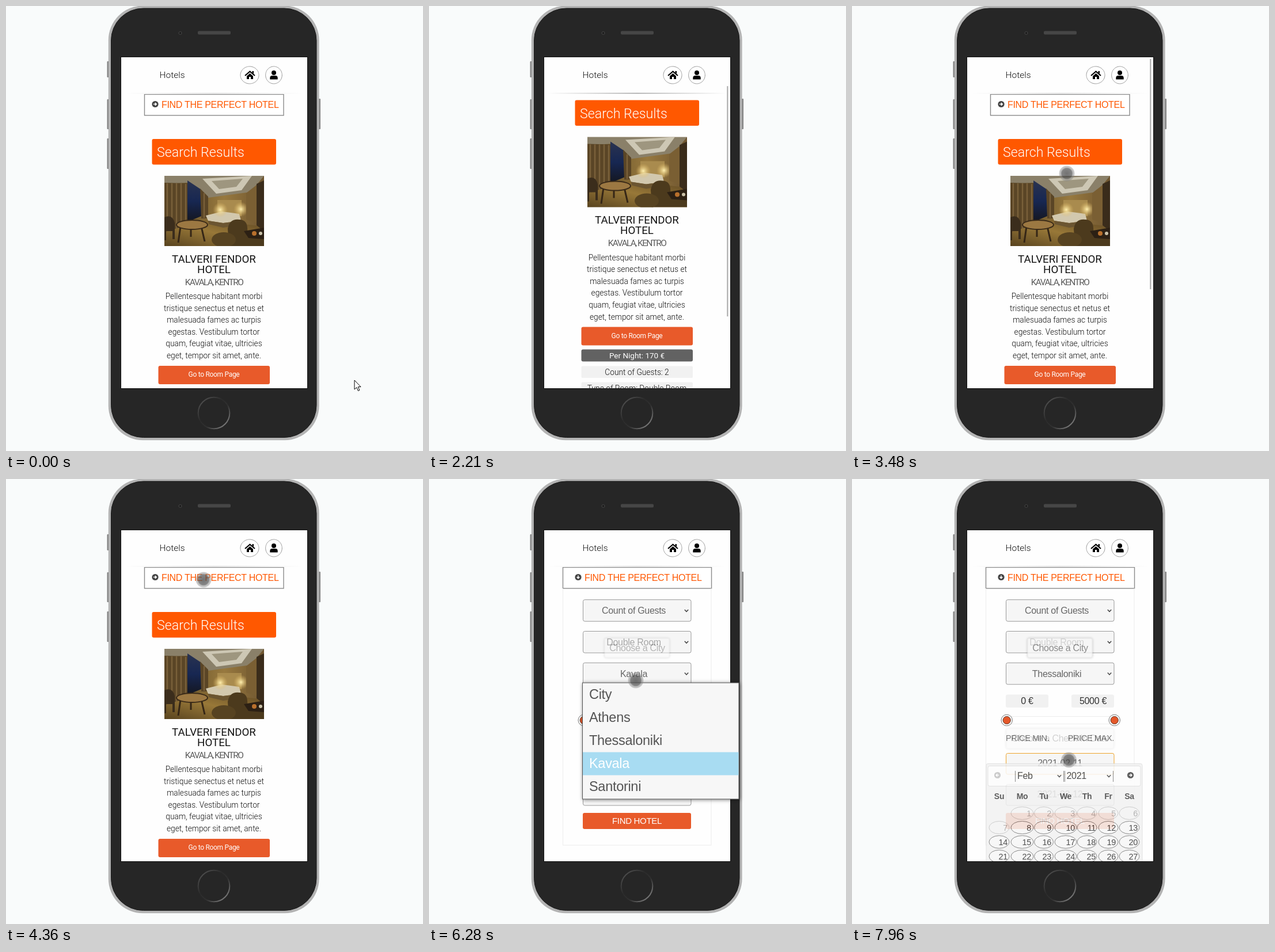
Recreate the animation shown at these times as an HTML page. Size 724 by 773 pixels, loop 8000 ms.

```html
<!DOCTYPE html>
<html lang="en">
<head>
<meta charset="utf-8">
<title>Hotel search on a phone</title>
<style>
html, body { margin: 0; width: 100%; height: 100%; overflow: hidden; background: #f9fbfb; }
svg { display: block; }
text { white-space: pre; }
.r { font-family: Roboto, sans-serif; font-weight: 300; fill: #111; }
.a { font: 16px "Liberation Sans", Arial, sans-serif; letter-spacing: -.3px; fill: #666; }
.mid { text-anchor: middle; }
.end { text-anchor: end; }
.body { font-size: 13.75px; }
.field { fill: #f6f6f6; stroke: #999; }
.chip { fill: #f1f1f1; }
.cta { fill: #e85a2a; }
.tip rect { fill: #f7f7f7; stroke: #ddd; filter: url(#soft); }
</style>
</head>
<body>
<svg width="724" height="773" viewBox="0 0 724 773">
  <defs>
    <clipPath id="screen"><rect x="200" y="89" width="323" height="575"/></clipPath>
    <clipPath id="view"><rect x="200" y="153" width="323" height="511"/></clipPath>
    <clipPath id="fold"><rect id="foldBox" x="230" y="190" width="264" height="0"/></clipPath>
    <clipPath id="frame"><rect width="173" height="122"/></clipPath>
    <linearGradient id="rule">
      <stop offset="0" stop-color="#999" stop-opacity="0"/>
      <stop offset=".5" stop-color="#999"/>
      <stop offset="1" stop-color="#999" stop-opacity="0"/>
    </linearGradient>
    <linearGradient id="ring" x1="0" y1="0" x2="1" y2="1">
      <stop offset="0" stop-color="#5c5c5c"/>
      <stop offset=".4" stop-color="#2b2b2b"/>
      <stop offset=".6" stop-color="#303030"/>
      <stop offset="1" stop-color="#9a9a9a"/>
    </linearGradient>
    <linearGradient id="carpet" x1="0" y1="1" x2="1" y2="0">
      <stop offset="0" stop-color="#58431f"/>
      <stop offset=".5" stop-color="#987838"/>
      <stop offset="1" stop-color="#5c4522"/>
    </linearGradient>
    <linearGradient id="wall">
      <stop offset="0" stop-color="#54431f"/>
      <stop offset=".6" stop-color="#98793f"/>
      <stop offset="1" stop-color="#6e5530"/>
    </linearGradient>
    <linearGradient id="night" x1="0" y1="0" x2="0" y2="1">
      <stop offset="0" stop-color="#2a3350"/>
      <stop offset=".5" stop-color="#172752"/>
      <stop offset="1" stop-color="#14161f"/>
    </linearGradient>
    <radialGradient id="dot">
      <stop offset="0" stop-color="#444" stop-opacity=".75"/>
      <stop offset=".66" stop-color="#505050" stop-opacity=".7"/>
      <stop offset=".78" stop-color="#777" stop-opacity=".5"/>
      <stop offset="1" stop-color="#888" stop-opacity=".38"/>
    </radialGradient>
    <radialGradient id="glow">
      <stop offset="0" stop-color="#fff0b0"/>
      <stop offset="1" stop-color="#e0b860" stop-opacity="0"/>
    </radialGradient>
    <filter id="soft" x="-20%" y="-40%" width="140%" height="180%">
      <feDropShadow dx="0" dy="0" stdDeviation="2" flood-opacity=".3"/>
    </filter>
    <filter id="drop">
      <feDropShadow dx="1" dy="1" stdDeviation="3" flood-opacity=".5"/>
    </filter>
  </defs>

  <!-- phone -->
  <g fill="#858585">
    <rect x="175.5" y="96" width="4" height="28" rx="1"/>
    <rect x="175.5" y="162" width="4" height="52" rx="1"/>
    <rect x="175.5" y="230" width="4" height="53" rx="1"/>
    <rect x="542" y="161" width="4" height="53" rx="1"/>
  </g>
  <rect x="177.8" y="-.5" width="365.8" height="754.7" rx="60" fill="#b3b3b3"/>
  <rect x="182.5" y="4" width="356.5" height="745.5" rx="56" fill="#262626" stroke="#1a1a1a"/>
  <rect x="333" y="43.5" width="57" height="6" rx="2" fill="#464646"/>
  <circle cx="302.5" cy="47" r="2.5" fill="#1c1c1c" stroke="#484848"/>
  <circle cx="361" cy="707" r="27.3" fill="none" stroke="url(#ring)" stroke-width="2"/>
  <rect x="199" y="88" width="325" height="577" fill="#111"/>
  <rect x="200" y="89" width="323" height="575" fill="#fefefe"/>

  <!-- page -->
  <g clip-path="url(#view)">
    <g id="page">
      <rect id="findBox" y="153.5" height="36.5" fill="#fff" stroke-width="1.4"/>
      <circle cx="259" cy="170.5" r="5.6" fill="#444"/>
      <path id="findArrow" d="M256 170.5h5m-2.2-2.4l2.4 2.4l-2.4 2.4" fill="none" stroke="#fff" stroke-width="1.5"/>
      <text class="a" x="270" y="177" style="fill:#ff5800">FIND THE PERFECT HOTEL</text>

      <g clip-path="url(#fold)">
        <rect id="foldEdge" x="232.5" y="188" width="257.5" height="0" fill="none" stroke="#ececec"/>
        <g id="form"></g>
      </g>

      <g id="results">
        <rect x="253.5" y="231" width="215.5" height="44.5" rx="3" fill="#ff5800"/>
        <text class="r" x="262" y="262" style="font-size:23.2px;fill:#fff">Search Results</text>
        <g transform="translate(275 295)" clip-path="url(#frame)">
          <rect width="173" height="122" fill="url(#wall)"/>
          <path d="M0 0H173L150 28L76 38L40 12L0 14Z" fill="#8a8069"/>
          <path d="M66 5L152 0L134 25L90 31Z" fill="#cdc7b4"/>
          <path d="M82 9L136 5L125 19L95 23Z" fill="#9e967f"/>
          <path d="M40 8L64 24V70L40 80Z" fill="url(#night)"/>
          <path d="M0 12L40 13V96L0 100ZM62 22L76 36V74H64Z" fill="#5a4526"/>
          <path d="M5 13V98M13 13V97M21 13V96M29 13V95M37 14V94M69 30V73" stroke="#79603a" stroke-width="2.5"/>
          <path d="M92 42H134V70H92Z" fill="#a98b4e"/>
          <path d="M0 98L70 76L173 88V122H0Z" fill="url(#carpet)"/>
          <path d="M72 69L100 62L130 66L133 78L102 82L76 78Z" fill="#d2c8ae"/>
          <path d="M76 78L102 82L133 78V85L102 90L77 84Z" fill="#6b5531"/>
          <circle cx="97" cy="59" r="13" fill="url(#glow)"/>
          <circle cx="133" cy="58" r="13" fill="url(#glow)"/>
          <path d="M142 30L160 16V82L142 76Z" fill="#7a5f33"/>
          <path d="M160 14L173 8V96L160 86Z" fill="#3a2c1b"/>
          <path d="M0 72Q14 66 18 82V110H14V96H3V112H0Z" fill="#3b2d1c"/>
          <path d="M28 88L24 116M64 88L70 114M46 90V106" stroke="#352616" stroke-width="3"/>
          <ellipse cx="48" cy="85" rx="27" ry="8" fill="#9c7842" stroke="#3a2a18" stroke-width="2"/>
          <path d="M110 92Q113 74 130 76Q146 76 144 98L173 106V122H112Z" fill="#4c3a1d"/>
          <path d="M138 96L173 90V110L146 108Z" fill="#2c2014"/>
          <circle cx="156" cy="100" r="4" fill="#b9702c"/>
          <circle cx="167" cy="100" r="3" fill="#c9c0a8"/>
          <ellipse cx="103" cy="111" rx="21" ry="13" fill="#574321"/>
        </g>
        <g class="r mid" style="font-size:18.7px;font-weight:400">
          <text x="361" y="445.5">TALVERI FENDOR</text>
          <text x="361" y="463.5">HOTEL</text>
        </g>
        <text class="r mid" x="361" y="484.5" style="font-size:15.5px;font-weight:400;letter-spacing:-1.6px;fill:#5c5c5c">KAVALA, KENTRO</text>
        <g id="blurb" class="r mid body"></g>
        <rect class="cta" x="264.5" y="625" width="193.5" height="32" rx="3"/>
        <text class="r mid" x="361" y="644" style="font-size:12px;font-weight:400;letter-spacing:-.3px;fill:#fff">Go to Room Page</text>
        <rect x="264.5" y="664" width="193.5" height="21" rx="3" fill="#626262"/>
        <rect class="chip" x="264.5" y="693" width="193.5" height="20.5" rx="2"/>
        <rect class="chip" x="264.5" y="721" width="193.5" height="20.5" rx="2"/>
        <g class="r mid body">
          <text x="361" y="679.5" style="font-size:13.5px;font-weight:400;fill:#fff">Per Night: 170 €</text>
          <text x="361" y="708">Count of Guests: 2</text>
          <text x="361" y="736">Type of Room: Double Room</text>
        </g>
        <path d="M275 802.5H448" stroke="#eee"/>
        <rect x="200" y="846" width="323" height="60" fill="#cbcbcb"/>
        <path d="M200 846.5H523" stroke="#8f8f8f" stroke-width="2"/>
        <text class="r mid" x="361" y="875.5" style="font-size:11.3px">© TutorVennil 2020</text>
      </g>
    </g>
  </g>

  <!-- top bar -->
  <text class="r" x="266.5" y="125" style="font-size:15.5px">Hotels</text>
  <g fill="#fff" stroke="#777" stroke-dasharray="1.6 .6">
    <ellipse cx="423" cy="120" rx="16" ry="15"/>
    <ellipse cx="465" cy="120" rx="14.3" ry="15"/>
  </g>
  <path d="M415 121L423.5 113.7L432 121" fill="none" stroke="#000" stroke-width="2.1"/>
  <path d="M418 121.8L423.5 117L429 121.8V127H425V123H422V127H418ZM427.5 113H430V118L427.5 116Z"/>
  <circle cx="465" cy="116" r="4"/>
  <path d="M458.3 127.5V125Q458.3 121 462 121H468Q471.7 121 471.7 125V127.5Z"/>
  <rect id="divider" x="205" y="150.8" width="312" height="1.6" fill="url(#rule)"/>
  <rect id="bar" x="517.3" width="2" height="400" fill="#a9a9a9"/>

  <!-- overlays -->
  <g id="cityTip" class="tip">
    <rect x="305" y="277" width="112" height="33" rx="2"/>
    <text class="a mid" x="361.5" y="298.5">Choose a City</text>
  </g>
  <g id="dateTip" class="tip">
    <rect x="268" y="434" width="186" height="34" rx="2"/>
    <text class="a mid" x="361.5" y="456">Choose a Check-In Date</text>
  </g>
  <g clip-path="url(#screen)"><g id="picker"></g></g>
  <g id="menu"></g>
  <circle id="touch" r="13.5" fill="url(#dot)"/>
  <path id="arrow" d="M0 0V16L3.8 12.5L6.4 18.5L8.8 17.4L6.3 11.6H11Z" fill="#fff" stroke="#000"/>
</svg>
<script>
const $ = id => document.getElementById(id);
const set = (id, attrs) => { for (const k in attrs) $(id).setAttribute(k, attrs[k]); };
const show = (id, o) => set(id, { opacity: o, display: o > 0 ? "inline" : "none" });
const label = (x, y, s, cls = "mid", extra = "") => `<text class="a ${cls}" x="${x}" y="${y}" ${extra}>${s}</text>`;
const box = (x, y, w, h, cls, extra = "") => `<rect x="${x}" y="${y}" width="${w}" height="${h}" rx="3" class="${cls}" ${extra}/>`;
const chevron = (x, y) => `<path d="M${x - 3.2} ${y - 1.8}l3.2 3.4l3.2-3.4" fill="none" stroke="#444" stroke-width="1.5"/>`;

$("blurb").innerHTML = [
  "Pellentesque habitant morbi", "tristique senectus et netus et", "malesuada fames ac turpis",
  "egestas. Vestibulum tortor", "quam, feugiat vitae, ultricies", "eget, tempor sit amet, ante."
].map((s, i) => `<text x="361" y="${509 + i * 20.6}">${s}</text>`).join("");

// search form
const select = (y, s, extra) => box(267.5, y, 187.5, 37.5, "field") + label(355.5, y + 24.3, s, "mid", extra) + chevron(447, y + 19);
const knob = x => `<circle cx="${x}" cy="419" r="9.7" fill="#fff" stroke="#777"/><circle cx="${x}" cy="419" r="6.6" fill="#e5582a" stroke="#5a3a2c"/>`;
const dark = 'style="fill:#333"', small = 'style="font-size:14.4px;fill:#444"';
$("form").innerHTML =
  select(209.7, "Count of Guests") + select(264.5, "Double Room") + select(319.3, "Kavala", 'id="city"') +
  box(267, 374.5, 74, 22.5, "chip") + label(304, 390.5, "0 €", "mid", dark) +
  box(381, 374.5, 74, 22.5, "chip") + label(418.5, 390.5, "5000 €", "mid", dark) +
  box(262, 412.5, 200, 13, "", 'fill="#fff" stroke="#ededed"') + knob(268.7) + knob(455.7) +
  label(267, 454.8, "PRICE MIN.", "", small) + label(455, 454.8, "PRICE MAX.", "end", small) +
  box(267.5, 476.5, 187.5, 36.5, "field", 'id="checkIn"') + label(361, 499, "2021-02-11") +
  box(267.5, 530.5, 187.5, 36.5, "field") + label(361, 553, "2021-02-12") +
  box(267, 580, 188, 28, "cta") + label(361, 599, "FIND HOTEL", "mid", 'style="font-size:15px;fill:#fff"');

// city list
const cities = ["City", "Athens", "Thessaloniki", "Kavala", "Santorini"];
$("menu").innerHTML =
  `<rect x="266.5" y="354" width="271.5" height="202" fill="#f7f7f7" stroke="#555" filter="url(#drop)"/>` +
  `<rect id="pick" x="267" width="270.5" height="40" fill="#a8dcf2"/>` +
  cities.map((c, i) => label(278, 382.3 + i * 40, c, "", `id="c${i}" style="font-size:23.5px"`)).join("");

// calendar: centre, half width and number edge per column
const cols = [[255.5, 17.5, 270], [295.5, 19.5, 311], [333, 16.5, 346], [371, 19, 387], [408, 17, 423], [445, 17, 458], [481.5, 17.5, 496]];
const round = (x, c, d) => `<circle cx="${x}" cy="514.5" r="5.6" fill="${c}"/><path d="M${x - 2.6 * d} 514.5h${5 * d}m${-2.4 * d}-2.4l${2.4 * d} 2.4l${-2.4 * d} 2.4" fill="none" stroke="#fff" stroke-width="1.4"/>`;
let cal = box(233, 494.5, 271, 190, "", 'fill="#f2f2f2" stroke="#ddd"') + box(236, 498.5, 265, 35, "", 'fill="#fcfcfc" stroke="#ddd"') +
  round(252.5, "#c4c4c4", -1) + round(483.5, "#444", 1) +
  '<path d="M283.5 507V526M367.5 507V526M369.5 507V526M453.5 507V526" stroke="#777"/>' +
  label(287, 521.3, "Feb", "", dark) + chevron(360, 516) + label(372.5, 521.3, "2021", "", dark) + chevron(446, 516);
["Su", "Mo", "Tu", "We", "Th", "Fr", "Sa"].forEach((d, i) =>
  cal += label(cols[i][0], 556, d, "mid", 'style="font-size:14px;font-weight:bold;fill:#444"'));
for (let n = 1; n <= 27; n++) {
  const [x, rx, edge] = cols[n % 7], y = 580.5 + Math.floor(n / 7) * 25;
  cal += `<g opacity="${n < 8 ? .38 : 1}"><ellipse cx="${x}" cy="${y}" rx="${rx}" ry="11" fill="#f6f6f6" stroke="#777"/>` +
    label(edge, y + 5, n, "end", 'style="font-size:14.4px;fill:#333"') + "</g>";
}
$("picker").innerHTML = cal;

// [time, values...]
const pointer = [
  [50, 605, 650], [250, 575, 575], [450, 505, 440], [650, 400, 260], [850, 349, 183], [1030, 349, 178], [1390, 349, 178],
  [1460, 346, 176], [1850, 346, 176], [2050, 373, 291], [3720, 373, 291], [4250, 343, 175], [4760, 343, 175],
  [5330, 345, 311], [5420, 345, 311], [5810, 346, 342], [6050, 346, 342], [6200, 359, 350], [6440, 359, 350],
  [6720, 354, 440], [6910, 354, 440], [7040, 352, 454], [7280, 352, 454], [7700, 376.5, 488]
];
const scroll = [
  [1950, 0], [2100, 22], [2210, 67], [2340, 125], [2500, 195], [2660, 232.5],
  [2920, 232.5], [3000, 215], [3120, 140], [3280, 45], [3400, 8], [3480, 0]
];
const ramp = (t, a, b) => Math.min(1, Math.max(0, (t - a) / (b - a)));
const at = (keys, t) => {
  let i = keys.findIndex(k => k[0] > t);
  if (i < 0) i = keys.length;
  const a = keys[Math.max(0, i - 1)], b = keys[Math.min(i, keys.length - 1)];
  const p = a === b ? 0 : (t - a[0]) / (b[0] - a[0]);
  return a.slice(1).map((v, n) => v + (b[n + 1] - v) * p);
};

function render(t) {
  const [s] = at(scroll, t), [x, y] = at(pointer, t);
  set("page", { transform: `translate(0 ${-s})` });
  set("bar", { y: 92 + s * .7 });
  show("bar", t < 1850 ? 0 : 1 - ramp(t, 3720, 3900));
  show("divider", s > 0 ? .9 : .32);

  const open = t >= 4386, grow = .5 - Math.cos(ramp(t, 4386, 4786) * Math.PI) / 2;
  const focus = open && t < 6050;
  set("findBox", { x: open ? 232.5 : 240.5, width: open ? 258 : 241.5, rx: focus ? 2 : 0, stroke: focus ? "#eea32a" : "#8a8a8a" });
  set("findArrow", { transform: open ? "rotate(90 259 170.5)" : "" });
  set("foldBox", { height: 447 * grow });
  set("foldEdge", { height: 2 + 446 * grow });
  set("form", { transform: `translate(0 ${-15 * (1 - grow)})` });
  set("results", { transform: `translate(0 ${446 * grow})` });

  const row = t < 6700 ? 3 : 2;
  show("menu", t >= 6050 && t < 7280 ? 1 : 0);
  set("pick", { y: 354.5 + row * 40 });
  cities.forEach((c, i) => $("c" + i).style.fill = i === row ? "#fff" : "#555");
  $("city").textContent = t < 7280 ? "Kavala" : "Thessaloniki";

  show("cityTip", ramp(t, 6050, 6560) * (1 - ramp(t, 7760, 8560)));
  show("dateTip", ramp(t, 7760, 8460));
  show("picker", .86 * ramp(t, 7740, 7960));
  $("checkIn").style.stroke = t >= 7760 ? "#eea32a" : "";

  const inside = x < 523;
  const hidden = t >= 2090 && t < 2920;
  show("touch", inside && !hidden ? 1 : 0);
  show("arrow", inside ? 0 : 1);
  set("touch", { cx: x, cy: y });
  set("arrow", { transform: `translate(${x} ${y})` });
}

const start = performance.now();
(function tick() {
  render((performance.now() - start) % 8000);
  requestAnimationFrame(tick);
})();
</script>
</body>
</html>
```
